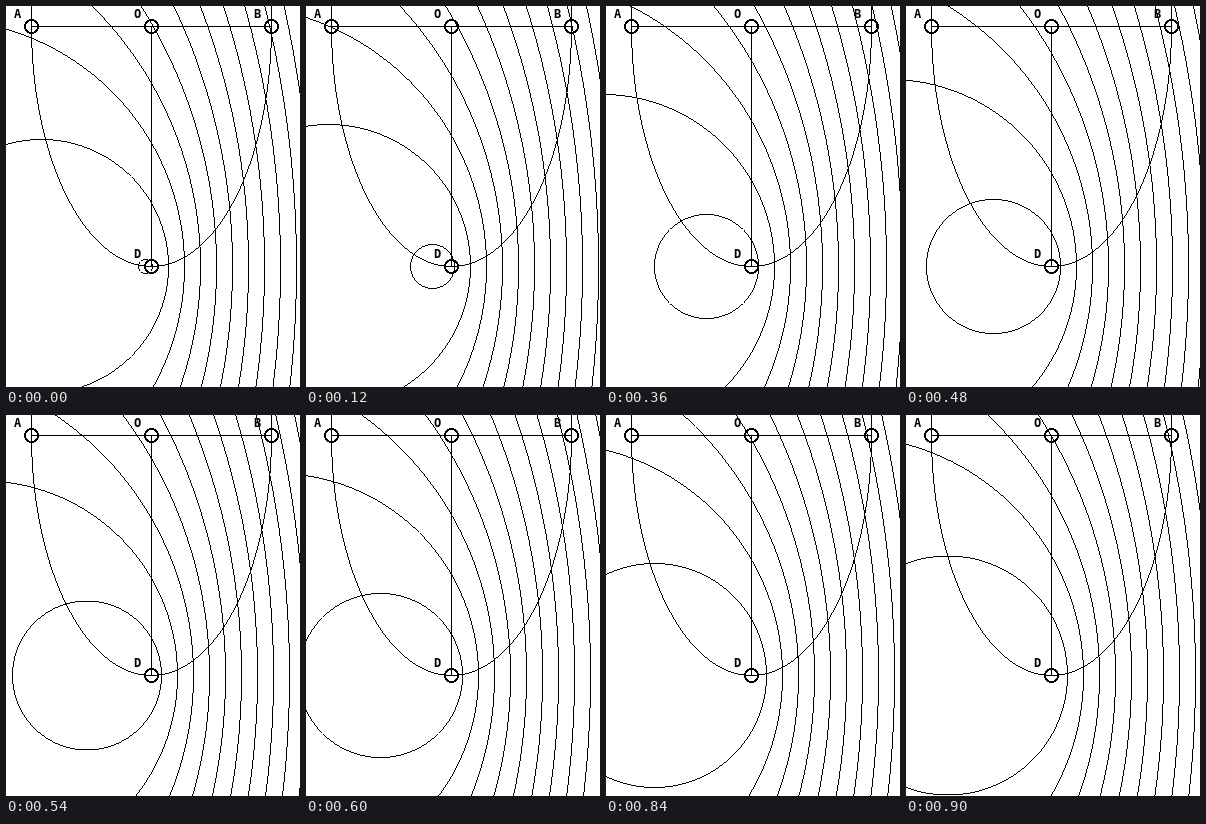
An HTML page with a canvas that plays this animation: 294x381 px, repeating every 0.96 s.

```html
<!DOCTYPE html>
<html lang="en">
<head>
<meta charset="utf-8">
<title>Moving wave source</title>
<style>
  html, body { margin: 0; width: 100%; height: 100%; overflow: hidden; background: #fff; }
  canvas, svg { position: absolute; left: 0; top: 0; width: 294px; height: 381px; display: block; }
  text { font: bold 12px "DejaVu Sans Mono", monospace; text-anchor: middle; fill: #000; }
</style>
</head>
<body>
<canvas id="stage" width="294" height="381"></canvas>
<svg viewBox="0 0 294 381">
  <text x="11.5" y="12">A</text>
  <text x="131.5" y="12">O</text>
  <text x="251.5" y="12">B</text>
  <text x="131.5" y="252">D</text>
</svg>
<script>
const W = 294, H = 381;
const STEP = 60, STEPS = 16, WAVES = 12;
const O = [145, 20], A = [25, 20], B = [265, 20], D = [145, 260];
const ctx = document.getElementById('stage').getContext('2d');

const dot = (x, y) => ctx.fillRect(Math.round(x), Math.round(y), 1, 1);

// One-pixel outline without smoothing: columns where it is flat, rows where it is steep.
function ellipse(cx, cy, rx, ry) {
  const flat = (dx, dy) => Math.abs(dx) * ry * ry <= Math.abs(dy) * rx * rx;
  for (let x = 0; x < W; x++) {
    const dx = x - cx;
    if (Math.abs(dx) > rx) continue;
    const dy = ry * Math.sqrt(1 - (dx / rx) ** 2);
    if (flat(dx, dy)) { dot(x, cy - dy); dot(x, cy + dy); }
  }
  for (let y = 0; y < H; y++) {
    const dy = y - cy;
    if (Math.abs(dy) > ry) continue;
    const dx = rx * Math.sqrt(1 - (dy / ry) ** 2);
    if (!flat(dx, dy)) { dot(cx - dx, y); dot(cx + dx, y); }
  }
}

function ring([cx, cy]) {
  for (let y = -7; y <= 7; y++) {
    for (let x = -7; x <= 7; x++) {
      const d = Math.hypot(x, y);
      if (d > 5.6 && d < 7.4) dot(cx + x, cy + y);
    }
  }
}

function draw(step) {
  ctx.fillStyle = '#fff';
  ctx.fillRect(0, 0, W, H);
  ctx.fillStyle = '#000';
  ctx.fillRect(A[0], A[1], B[0] - A[0] + 1, 1);
  ctx.fillRect(O[0], O[1], 1, D[1] - O[1] + 1);
  ellipse(O[0], O[1], 120, 240);
  [A, O, B, D].forEach(ring);

  // Each wave grows while its centre drifts left.
  for (let k = 0; k < WAVES; k++) {
    const age = step + k * STEPS;
    const r = 7 + 7.5 * age;
    ellipse(139 - 6.5 * age, D[1], r, r);
  }
}

const start = performance.now();
let shown = -1;
function tick() {
  const step = Math.floor((performance.now() - start) / STEP) % STEPS;
  if (step !== shown) draw(shown = step);
  requestAnimationFrame(tick);
}
tick();
</script>
</body>
</html>
```
